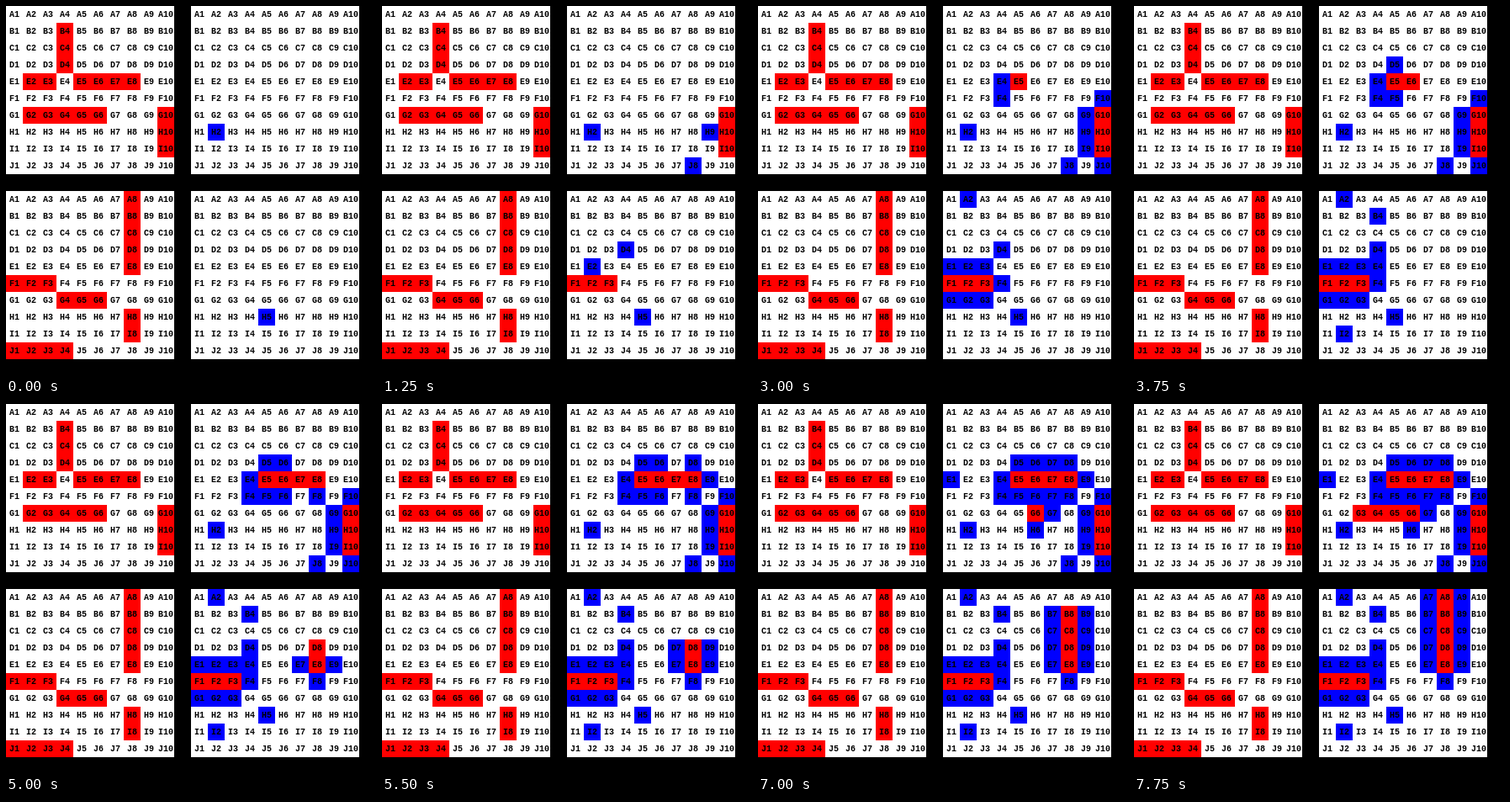
An HTML page with a canvas for the animation above (8 s loop, 440 px wide and 440 px high).

```html
<!DOCTYPE html>
<html>
<head>
<meta charset="utf-8">
<title>Battleship</title>
<style>
  html, body { margin: 0; width: 100%; height: 100%; overflow: hidden; background: #000; }
  canvas { display: block; }
</style>
</head>
<body>
<canvas id="stage" width="440" height="440"></canvas>
<script>
const CELL = 20, STEP = 250, STEPS = 32;
const ctx = document.getElementById('stage').getContext('2d');
const cells = text => text.split(' ');

// Each game: the hidden fleet and the shots fired at it, one per step.
const games = [
  {
    y: 0,
    ships: cells('B4 C4 D4 E2 E3 E5 E6 E7 E8 G2 G3 G4 G5 G6 G10 H10 I10'),
    shots: cells('H2 J8 G10 H10 H9 I10 J10 I9 G9 F10 F4 E5 E4 D5 F5 E6 ' +
                 'D6 F6 E7 E8 F8 E9 D8 D7 F7 E1 G6 G7 H6 G5 G4 G3')
  },
  {
    y: 220,
    ships: cells('A8 B8 C8 D8 E8 F1 F2 F3 G4 G5 G6 H8 I8 J1 J2 J3 J4'),
    shots: cells('H5 D4 F2 F1 E2 F3 G2 E1 G1 F4 E3 G3 A2 B4 I2 E4 ' +
                 'E8 E7 E9 F8 D8 D7 D9 C8 C7 B8 C9 B7 B9 A8 A9 A7')
  }
];

function drawBoard(x, y, ships, marked) {
  for (let row = 0; row < 10; row++) {
    for (let col = 0; col < 10; col++) {
      const name = 'ABCDEFGHIJ'[row] + (col + 1);
      const left = x + col * CELL, top = y + row * CELL;
      ctx.fillStyle = !marked.includes(name) ? '#fff' : ships.includes(name) ? '#f00' : '#00f';
      ctx.fillRect(left, top, CELL, CELL);
      ctx.fillStyle = '#000';
      ctx.fillText(name, left + CELL / 2, top + 13);
    }
  }
}

function draw(time) {
  const step = Math.floor(time / STEP) % STEPS;
  ctx.fillStyle = '#000';
  ctx.fillRect(0, 0, 440, 440);
  ctx.font = 'bold 10px "Liberation Mono", monospace';
  ctx.textAlign = 'center';
  for (const { y, ships, shots } of games) {
    drawBoard(0, y, ships, ships);
    drawBoard(220, y, ships, shots.slice(0, step + 1));
  }
}

const start = performance.now();
function tick() {
  draw(performance.now() - start);
  requestAnimationFrame(tick);
}
tick();
</script>
</body>
</html>
```
